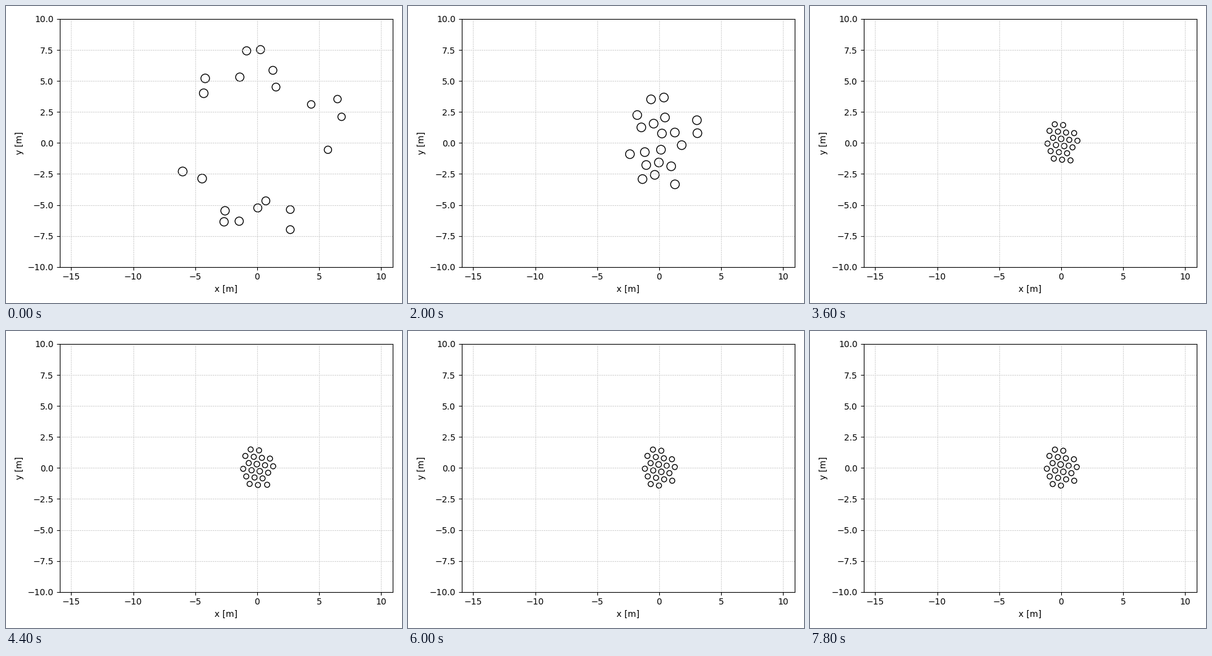
A matplotlib script for the animation above (8000 ms loop, 640 by 480 pixels).

```python
import numpy as np
import matplotlib.pyplot as plt
from matplotlib.animation import FuncAnimation

FRAMES, STEP = 40, 200          # 8 s loop
SUBSTEPS = 10
SPEED = 1.955                   # metres per second
GAP_WIDE, GAP_TIGHT = 1.05, 0.68
R_WIDE, R_TIGHT = 0.352, 0.208

START = np.array([
    (-0.85, 7.43), (0.27, 7.53), (1.27, 5.86), (1.52, 4.51), (-1.40, 5.31),
    (-4.19, 5.21), (-4.31, 4.01), (4.36, 3.11), (6.48, 3.54), (6.81, 2.11),
    (5.71, -0.55), (-6.01, -2.30), (-4.44, -2.87), (-2.59, -5.47),
    (-2.67, -6.36), (-1.45, -6.31), (0.05, -5.24), (0.70, -4.67),
    (2.67, -5.37), (2.67, -6.99)])


def squeeze(t):
    """0 while travelling, 1 once the group has packed together."""
    u = np.clip((t - 2.0) / 1.3, 0, 1)
    return u * u * (3 - 2 * u)


def lerp(a, b, u):
    return a + (b - a) * u


def spread(pos, gap):
    """Push apart every pair that is closer than the gap."""
    diff = pos[:, None] - pos
    dist = np.linalg.norm(diff, axis=2)
    push = 0.2 * np.maximum(gap - dist, 0) / np.maximum(dist, 1e-6)
    return pos + (diff * push[:, :, None]).sum(axis=1)


def simulate():
    """Robots head for the origin while keeping their distance."""
    dt = STEP / 1000 / SUBSTEPS
    pos, track = START, []
    for n in range(FRAMES * SUBSTEPS):
        if n % SUBSTEPS == 0:
            track.append(pos)
        dist = np.linalg.norm(pos, axis=1, keepdims=True)
        pace = np.minimum(SPEED, 3 * dist)
        pos = pos - pos / np.maximum(dist, 1e-6) * pace * dt
        for _ in range(4):
            pos = spread(pos, lerp(GAP_WIDE, GAP_TIGHT, squeeze(n * dt)))
    return track


def radii(pos, t):
    """Smaller when packed, larger at the goal, uneven at the outset."""
    r = lerp(R_WIDE, R_TIGHT, squeeze(t))
    goal = 0.06 * np.exp(-(np.linalg.norm(pos, axis=1) / 0.3) ** 2)
    side = START[:, 0] / np.linalg.norm(START, axis=1)
    return r + goal - (0.025 + 0.03 * side) * np.exp(-t / 0.3)


fig, ax = plt.subplots(figsize=(6.4, 4.8), dpi=100)
ax.set(xlim=(-15.9, 10.9), ylim=(-10, 10), xlabel="x [m]", ylabel="y [m]")
ax.set_xticks(range(-15, 11, 5))
ax.set_yticks(np.arange(-10, 10.1, 2.5))
ax.grid(True, linestyle=":")
fig.tight_layout()
fig.subplots_adjust(top=fig.subplotpars.top - 0.5 / 480)
box = ax.get_window_extent()
half = 10 * box.width / box.height
ax.set_xlim(-2.5 - half, -2.5 + half)

track = simulate()
robots = [ax.add_patch(plt.Circle(p, R_WIDE, fill=False, lw=1, ec="black"))
          for p in START]


def draw(frame):
    pos = track[frame]
    for robot, centre, r in zip(robots, pos, radii(pos, frame * STEP / 1000)):
        robot.center = centre
        robot.radius = r
    return robots


anim = FuncAnimation(fig, draw, frames=FRAMES, interval=STEP,
                     init_func=lambda: draw(0), repeat=True, repeat_delay=0)
plt.show()
```
